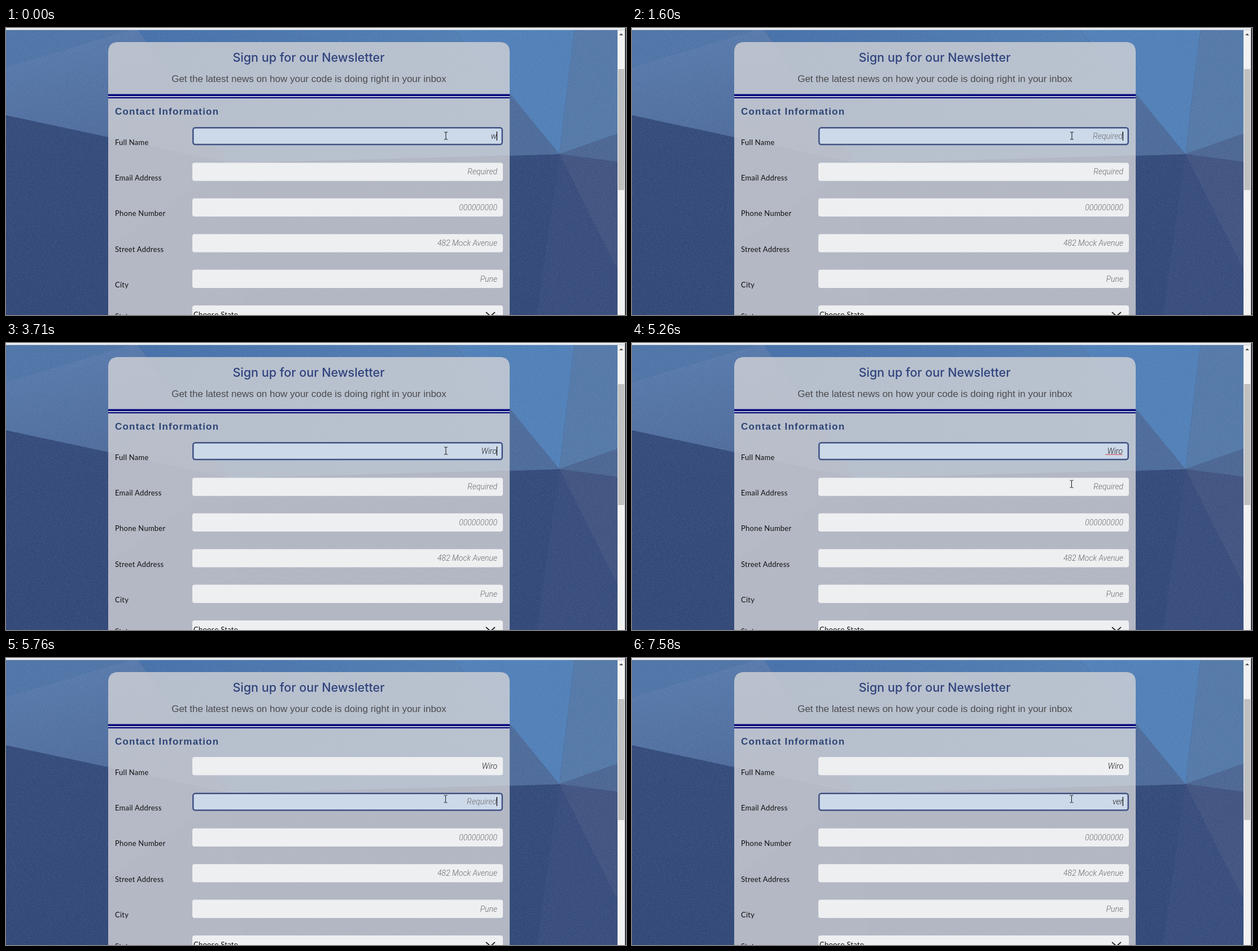
Write an HTML page that moves like this. It is 1098 px wide and 510 px high and loops after 8 s.

```html
<!DOCTYPE html>
<html lang="en">
<head>
<meta charset="utf-8">
<title>Newsletter form</title>
<style>
  html, body { margin: 0; width: 100%; height: 100%; overflow: hidden; }
  svg { display: block; width: 100vw; height: 100vh; }
  .title { font: 500 21.5px Inter, sans-serif; fill: #2f437c; text-anchor: middle; }
  .subtitle { font: 17px "Liberation Sans", Arial, sans-serif; fill: #4b4b4d; text-anchor: middle; }
  .section { font: bold 17px "Liberation Sans", Arial, sans-serif; letter-spacing: 1.2px; fill: #2c4475; }
  .label { font: 13px Lato, sans-serif; letter-spacing: .25px; fill: #111; }
  .value { font: italic 300 14px Roboto, sans-serif; text-anchor: end; fill: #222; }
  .hint { fill: #6c6c6e; }
  .tip { font: 9.2px "Open Sans", sans-serif; fill: #777; }
</style>
</head>
<body>
<svg id="stage" viewBox="0 0 1098 510" preserveAspectRatio="none">
  <defs>
    <linearGradient id="slope" x1="0" y1="0" x2=".3" y2="1">
      <stop offset="0" stop-color="#587caf"/><stop offset="1" stop-color="#4c6898"/>
    </linearGradient>
    <linearGradient id="sky" x1="0" y1="0" x2="1" y2="0">
      <stop offset="0" stop-color="#456fa8"/><stop offset="1" stop-color="#5481b5"/>
    </linearGradient>
    <linearGradient id="deep" x1="0" y1="0" x2="0" y2="1">
      <stop offset="0" stop-color="#344b7b"/><stop offset="1" stop-color="#304676"/>
    </linearGradient>
    <filter id="grain" x="0" y="0" width="1" height="1">
      <feTurbulence type="fractalNoise" baseFrequency=".7" numOctaves="2" seed="4"/>
      <feColorMatrix values="0 0 0 0 .6  0 0 0 0 .7  0 0 0 0 .82  1.2 0 0 0 -.5"/>
    </filter>
  </defs>

  <!-- Faceted backdrop -->
  <rect width="1098" height="510" fill="url(#deep)"/>
  <path d="M0 0H232L395 240L0 155Z" fill="url(#slope)"/>
  <path d="M0 0H232L0 70Z" fill="#4e73a6"/>
  <path d="M232 0H790L980 224L395 240Z" fill="url(#sky)"/>
  <path d="M790 0H1007L980 224Z" fill="#507fb7"/>
  <path d="M892 116L980 224L892 227Z" fill="#4c6a99"/>
  <path d="M1007 0H1083V188L980 224Z" fill="#5378a7"/>
  <path d="M980 224L1083 188V238Z" fill="#4b6592"/>
  <path d="M980 224L1083 238V430Z" fill="#40527f"/>
  <path d="M980 224L1083 430V510H940Z" fill="#364b7b"/>
  <path d="M395 240L181 390V195Z" fill="#3d5484"/>
  <path d="M395 240L420 510H181V390Z" fill="#374d7d"/>
  <rect width="1083" height="510" filter="url(#grain)" opacity=".3"/>
  <rect width="1098" height="3.5" fill="#eceff2"/>

  <!-- Scrollbar -->
  <rect x="1083" y="3.5" width="13.5" height="507" fill="#f1f1f1"/>
  <rect x="1084" y="73" width="11" height="215" fill="#c1c1c1"/>
  <path d="M1086 13L1089.5 9.5L1093 13Z" fill="#505050"/>
  <rect x="1096.5" width="1.5" height="510" fill="#17191d"/>

  <!-- Form panel -->
  <path d="M181 510V43Q181 25 199 25H874Q892 25 892 43V510Z" fill="#d3d3d6" fill-opacity=".8"/>
  <text class="title" x="536" y="60">Sign up for our Newsletter</text>
  <text class="subtitle" x="536.5" y="96">Get the latest news on how your code is doing right in your inbox</text>
  <path d="M181 117.5H892V121H181ZM181 123H892V125H181Z" fill="#00007d"/>
  <text class="section" x="193" y="154">Contact Information</text>
  <g id="fields"></g>
  <text class="label" x="193" y="517">State</text>
  <text class="label" x="332" y="514">Choose State</text>
  <path d="M850 505L858 512L866 505" fill="none" stroke="#222" stroke-width="1.8"/>

  <path id="squiggle" fill="none" stroke="#e0242c"/>
  <rect id="caret" width="1.2" height="16" fill="#000"/>
  <g id="tooltip">
    <rect x="779" y="260" width="108" height="15" fill="#000" opacity=".1"/>
    <rect x="777" y="258" width="107" height="14" fill="#f4f4f6" fill-opacity=".65" stroke="#aaa" stroke-opacity=".5"/>
    <text class="tip" x="781" y="269" opacity=".4">Please fill out this field.</text>
  </g>
  <path id="beam" d="M-3 -6.5H-1L0 -5.5L1 -6.5H3M0 -5.5V5.5M-3 6.5H-1L0 5.5L1 6.5H3" fill="none" stroke="#151515"/>
  <path id="arrow" d="M.5 .5V13L3.5 10.3L5.6 15L7.6 14.1L5.5 9.5H9.5Z" fill="#fff" stroke="#000" stroke-width=".9"/>
</svg>

<script>
const LOOP = 8000;
const PITCH = 63.4;
const NAME = 0, EMAIL = 1, NONE = -1;
const byId = id => document.getElementById(id);

const rows = [
  ["Full Name", "Required"],
  ["Email Address", "Required"],
  ["Phone Number", "000000000"],
  ["Street Address", "482 Mock Avenue"],
  ["City", "Pune"],
  ["", ""]
];

function add(parent, tag, attributes, text = "") {
  const node = document.createElementNS("http://www.w3.org/2000/svg", tag);
  for (const key in attributes) node.setAttribute(key, attributes[key]);
  node.textContent = text;
  return parent.appendChild(node);
}

const fields = rows.map(([label, hint], i) => {
  const y = 176 + i * PITCH;
  const group = byId("fields");
  add(group, "text", { class: "label", x: 193, y: Math.round(y + 31.5) }, label);
  return {
    hint,
    box: add(group, "rect", { rx: 4 }),
    y,
    text: add(group, "text", { y: Math.round(y + 21) })
  };
});

// Each entry changes part of the state from its time on.
const timeline = [
  [0, { name: "w", email: "", focus: NAME, caretRow: NAME, caret: true,
        beam: [779, 191.5], arrow: null, squiggle: false, tooltip: false }],
  [250, { name: "wi" }],
  [520, { name: "wir" }],
  [1060, { caret: false }],
  [1330, { name: "w" }],
  [1600, { name: "", caret: true }],
  [2130, { caret: false }],
  [2650, { name: "W", caret: true }],
  [3180, { name: "Wi" }],
  [3430, { name: "Wir" }],
  [3710, { name: "Wiro" }],
  [4240, { caret: false }],
  [4500, { beam: [779, 203.5] }],
  [4750, { beam: null, arrow: [776, 233], caret: true }],
  [5000, { beam: [779, 246.5], arrow: null }],
  [5260, { beam: [778.5, 250.5], caret: false, squiggle: true }],
  [5510, { focus: NONE, caretRow: EMAIL, caret: true, squiggle: false, tooltip: true }],
  [5760, { focus: EMAIL, tooltip: false }],
  [6010, { caret: false }],
  [6790, { caret: true }],
  [7040, { email: "v" }],
  [7310, { email: "ve" }],
  [7580, { email: "ver" }]
];

function stateAt(time) {
  const past = timeline.filter(([start]) => start <= time);
  return Object.assign({}, ...past.map(([, change]) => change));
}

const show = (node, visible) => node.style.display = visible ? "" : "none";

function place(node, point) {
  show(node, point);
  if (point) node.setAttribute("transform", `translate(${point})`);
}

function drawField(field, value, focused) {
  const inset = focused ? 1.25 : 0;
  const box = {
    x: 330 + inset, y: field.y + inset,
    width: 550 - 2 * inset, height: 32.3 - 2 * inset,
    fill: focused ? "#ccd9e9" : "#eeeff1",
    stroke: focused ? "#405183" : "none", "stroke-width": 2.5
  };
  for (const key in box) field.box.setAttribute(key, box[key]);
  field.text.setAttribute("x", focused ? 869 : 870);
  field.text.setAttribute("class", value ? "value" : "value hint");
  field.text.textContent = value || field.hint;
}

let zigzag = "M838.5 199";
for (let x = 840; x <= 869; x += 1.5) zigzag += `L${x} ${x % 3 ? 199 : 197.5}`;
byId("squiggle").setAttribute("d", zigzag);

function draw(now) {
  const state = stateAt(now % LOOP);
  const values = [state.name, state.email];
  fields.forEach((field, i) => drawField(field, values[i], i === state.focus));
  show(byId("caret"), state.caret);
  byId("caret").setAttribute("x", state.focus === NONE ? 869.8 : 868.8);
  byId("caret").setAttribute("y", Math.round(184 + state.caretRow * PITCH));
  show(byId("squiggle"), state.squiggle);
  show(byId("tooltip"), state.tooltip);
  place(byId("beam"), state.beam);
  place(byId("arrow"), state.arrow);
}

const begin = performance.now();
function tick() {
  draw(performance.now() - begin);
  requestAnimationFrame(tick);
}
tick();
</script>
</body>
</html>
```
